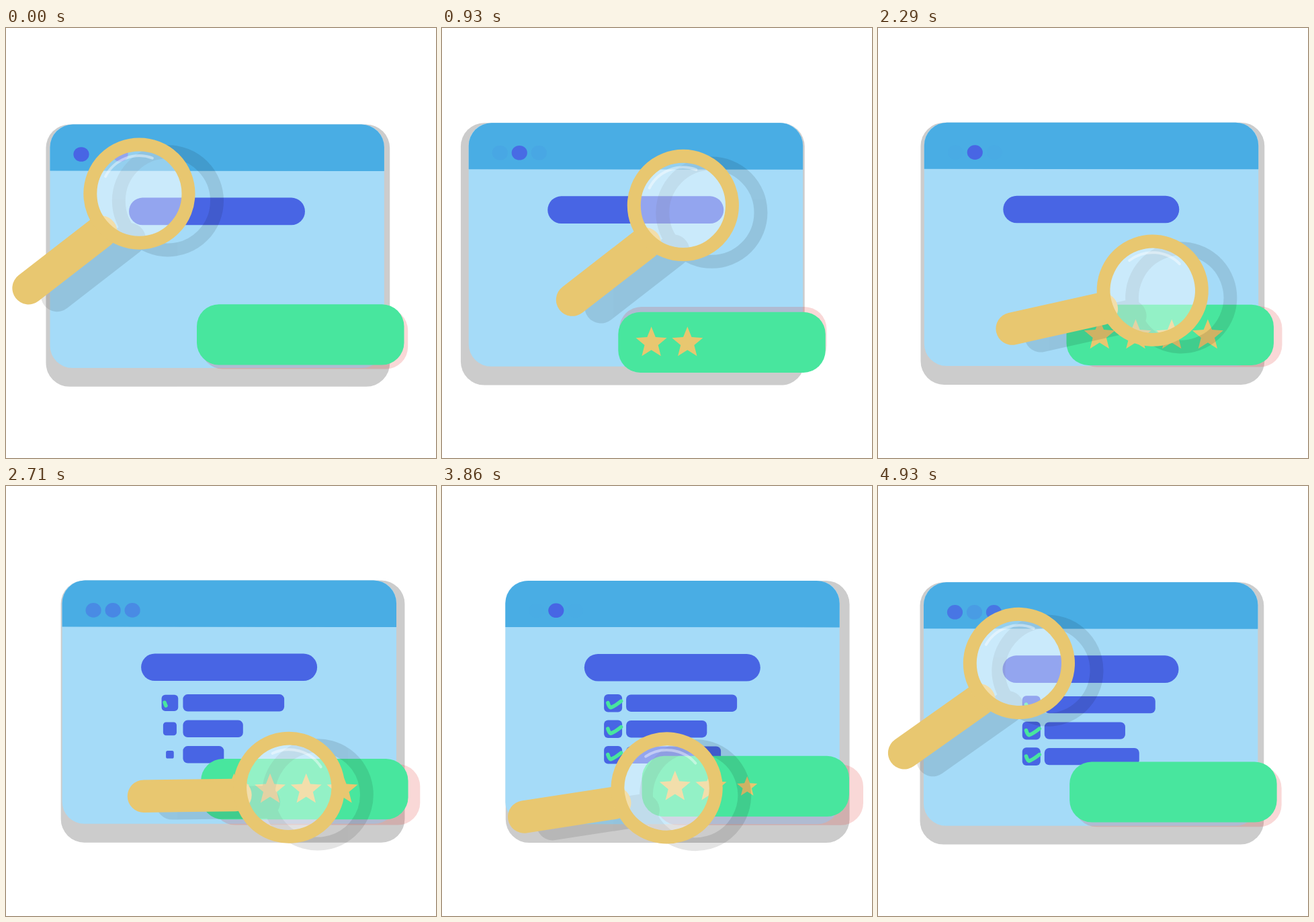
Recreate the animation shown at these times as an HTML page. Size 640x640 px, loop 5000 ms.

```html
<!DOCTYPE html>
<html lang="en">
<head>
<meta charset="utf-8">
<title>Search review</title>
<style>
  html, body { margin: 0; width: 100%; height: 100%; overflow: hidden; background: #fff; }
  svg { display: block; width: 100%; height: 100%; }
  .ink { fill: #4865e4; }
  .gold { color: #e8c770; fill: #e8c770; }
  .check { fill: none; stroke: #48e69e; stroke-width: 5.6; stroke-linecap: round; stroke-linejoin: round; stroke-dasharray: 1 2; }
</style>
</head>
<body>
<svg viewBox="0 0 640 640">
  <defs>
    <g id="handle">
      <path d="M-164.8 140.6L-57 57" fill="none" stroke="currentColor" stroke-width="48.5" stroke-linecap="round"/>
    </g>
    <circle id="ring" r="73.1" fill="none" stroke="currentColor" stroke-width="20"/>
  </defs>

  <rect id="back" width="511.8" height="390.2" rx="35" fill="#ccc"/>

  <g id="win">
    <rect width="497.4" height="362.3" rx="33" fill="#a5dbf8"/>
    <path d="M0 69V34A34 34 0 0 1 34 0H463.4A34 34 0 0 1 497.4 34V69.5Z" fill="#49ade4"/>
    <g id="dots" class="ink"></g>
    <rect class="ink" x="117.5" y="109" width="262" height="40.6" rx="20.3"/>
    <g id="rows"></g>
    <rect x="224.2" y="273.6" width="308.5" height="90.3" rx="33" fill="#dc322d" fill-opacity=".19"/>
  </g>

  <g id="card">
    <rect width="308.5" height="90.2" rx="33" fill="#48e69e"/>
    <g id="stars" class="gold"></g>
  </g>

  <g id="shade" color="#000" opacity=".1">
    <use href="#handle"/>
    <use href="#ring"/>
  </g>
  <g id="glass" class="gold">
    <use href="#handle"/>
    <circle r="64" fill="#fff" fill-opacity=".41"/>
    <path d="M-50.3 -25.7A56.5 56.5 0 0 1 19.5 -53" fill="none" stroke="#fff" stroke-opacity=".42" stroke-width="4" stroke-linecap="round"/>
    <use href="#ring"/>
  </g>
</svg>

<script>
const LOOP = 5000, FPS = 14, RATE = 0.00245;
const $ = id => document.getElementById(id);
const clamp = v => Math.max(0, Math.min(1, v));
const easeOut = u => 1 - (1 - clamp(u)) ** 3;

function add(parent, tag, attrs) {
  const el = document.createElementNS('http://www.w3.org/2000/svg', tag);
  for (const k in attrs) el.setAttribute(k, attrs[k]);
  return parent.appendChild(el);
}
const move = (el, x, y, more = '') => el.setAttribute('transform', `translate(${x} ${y}) ${more}`);

// Each part chases its current target: [start time, ...values]
const winPath = [[0, 65.5, 143.6], [0, 36.8, 141.1], [1930, 91.6, 140.4], [2715, 95, 140.9], [3925, 65.5, 143.6]];
const cardPath = [[0, 284, 411.2], [0, 259.8, 424], [1930, 295.2, 402.9], [2715, 298, 401.6], [3925, 284, 411.2]];
const glassPath = [[0, 198.4, 246.6, 0], [114, 384.1, 266.7, 0], [1930, 428, 480, 43.4], [2715, 329, 449.5, 28.5], [3925, 198.3, 246.6, 0]];

function chase(path, t) {
  let pos = path[0].slice(1);
  for (let i = 1; i < path.length && t > path[i][0]; i++) {
    const [start, ...goal] = path[i];
    const end = i + 1 < path.length ? Math.min(t, path[i + 1][0]) : t;
    const left = Math.exp(-RATE * (end - start));
    pos = pos.map((v, k) => goal[k] + (v - goal[k]) * left);
  }
  return pos;
}

const dots = [46.5, 75.5, 104.5].map(cx => add($('dots'), 'ellipse', { cx, cy: 44.4, rx: 11.6, ry: 10.8 }));

const rows = [165, 120.2, 141].map((width, i) => {
  const y = 182.3 + i * 38.5;
  const box = add($('rows'), 'rect', { class: 'ink', x: -13.5, y: -13.3, width: 27, height: 26.6, rx: 6 });
  const bar = add($('rows'), 'rect', { class: 'ink', x: 179.8, y: y - 12.7, height: 25.4, rx: 7 });
  const check = add($('rows'), 'path', { class: 'check', pathLength: 1, d: 'M-7.8 -.5Q-6 5.5 -3.6 6.6Q2 5 12 -3' });
  move(check, 160.3, y);
  return { y, width, box, bar, check };
});

const starShape = Array.from({ length: 10 }, (_, i) => {
  const r = i % 2 ? 10.6 : 24.2, a = i * Math.PI / 5;
  return `${(r * Math.sin(a)).toFixed(2)},${(-r * Math.cos(a)).toFixed(2)}`;
}).join(' ');
const stars = [[400, 4200], [540, 4060], [960, 3720], [1300, 3380]].map(([on, off], i) =>
  ({ on, off, x: 49.3 + i * 53.7, el: add($('stars'), 'polygon', { points: starShape }) }));

function draw(t) {
  const [wx, wy] = chase(winPath, t);
  move($('win'), wx, wy);
  move($('back'), 24.3 + (wx - 36.8) * 1.225, wy);
  move($('card'), ...chase(cardPath, t));

  const [gx, gy, turn] = chase(glassPath, t);
  move($('glass'), gx, gy, `rotate(${turn})`);
  move($('shade'), gx + 42.5, gy + 10.7, `rotate(${turn})`);

  const blink = 0.5 + 0.5 * Math.cos(t / 1560 * 2 * Math.PI);
  dots.forEach((d, i) => d.setAttribute('opacity', i === 1 ? 1 - blink : blink));

  rows.forEach(({ y, width, box, bar, check }, i) => {
    const p = easeOut((t - 2324 - i * 135) / 700);
    const drawn = clamp((t - 2650 - i * 135) / 350);
    move(box, 160.3, y, `scale(${p})`);
    bar.setAttribute('width', width * p);
    check.setAttribute('stroke-dashoffset', 1 - drawn);
    check.setAttribute('visibility', drawn > 0 ? 'visible' : 'hidden');
  });

  stars.forEach(({ on, off, x, el }) => {
    const size = easeOut((t - on) / 380) * clamp(1 - (t - off) / 400);
    move(el, x, 46, `scale(${size})`);
  });
}

const begin = performance.now();
function tick() {
  const t = (performance.now() - begin) % LOOP;
  const step = Math.floor((t + 8) * FPS / 1000) % (LOOP * FPS / 1000);
  draw(step * 1000 / FPS);
  requestAnimationFrame(tick);
}
tick();
</script>
</body>
</html>
```
